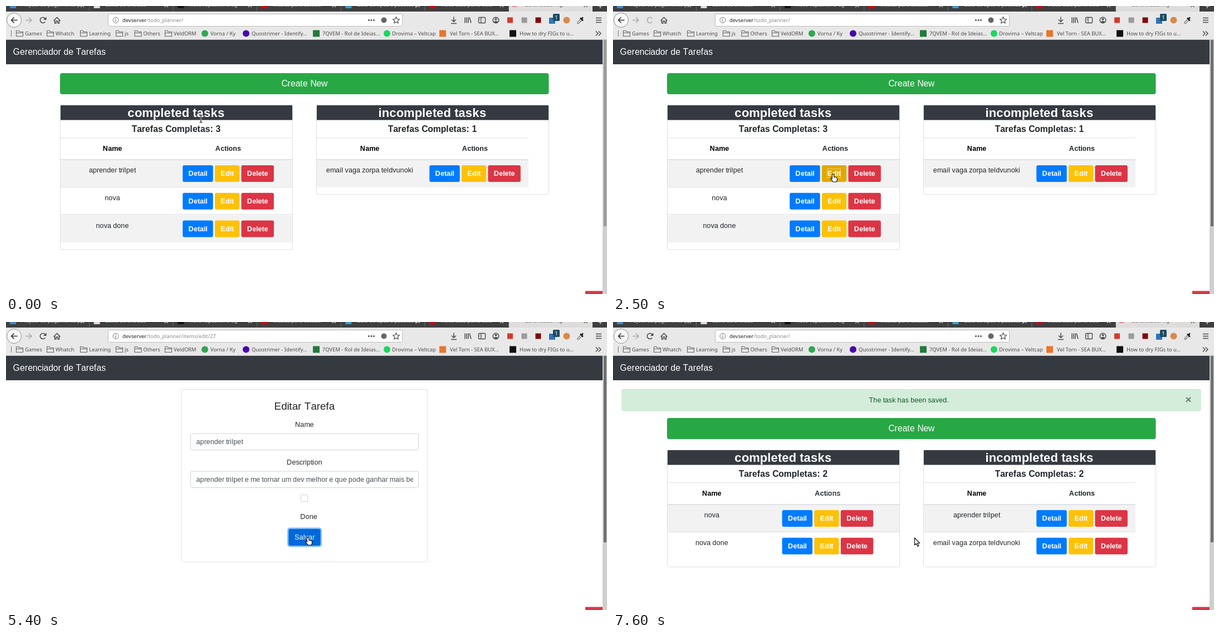
Write an HTML page with a canvas that moves like this. It is 1079x519 px and loops after 8000 ms.

```html
<!DOCTYPE html>
<html lang="pt">
<head>
<meta charset="utf-8">
<title>Gerenciador de Tarefas</title>
<style>
html, body { margin: 0; width: 100%; height: 100%; overflow: hidden; background: #fff; }
canvas { display: block; }
</style>
</head>
<body>
<canvas id="stage" width="1079" height="519"></canvas>
<script>
const ctx = document.getElementById('stage').getContext('2d');
const LOOP = 8000, ZOOM = .7855;
const UI = '"Noto Sans", sans-serif', PAGE = '"Liberation Sans", Arial, sans-serif';
const DARK = '#343a40', INK = '#212529', LINE = '#dee2e6', ICON = '#4a4a4a';

// Pointer steps: time, x, y, shape
const POINTER = [
  [0, 350, 203, 'beam'], [400, 350, 226, 'beam'], [500, 350, 254, 'arrow'],
  [600, 349, 282, 'arrow'], [700, 349, 300, 'hand'],
  [1400, 359, 300, 'hand'], [1500, 371, 301, 'hand'], [1600, 380, 303, 'hand'],
  [1700, 384, 303, 'hand'], [1800, 387, 303, 'hand'], [1900, 390, 303, 'hand'],
  [2000, 392, 303, 'hand'], [2100, 394, 303, 'hand'], [2200, 395, 303, 'hand'],
  [3700, 479.5, 306, 'arrow'], [4000, 503, 317, 'arrow'], [4100, 537, 334, 'arrow'],
  [4200, 549, 338, 'arrow'], [4400, 545, 331, 'arrow'], [4500, 539, 321, 'arrow'],
  [4900, 540, 333, 'arrow'], [5000, 541, 354, 'arrow'], [5100, 542, 376, 'hand'],
  [5200, 542, 388, 'hand'], [6600, 541, 389, 'arrow']
];
const SHAPES = {
  arrow: new Path2D('M.5 0V13l3-2.7 2.3 5 2.2-1-2.3-4.8H9.7Z'),
  hand: new Path2D('M-1.6 1Q0-1.2 1.6 1V5l4.4 1q1.6.5 1.5 2v3l-1.3 3H.2L-4 8.6q-.5-1.6 1-1.6l1.4 1.3Z')
};
// Reload button: start time and state
const RELOAD = [
  [0, 'ready'], [2500, 'wait'], [3700, 'stop'], [4200, 'wait'], [4400, 'ready'],
  [5600, 'wait'], [5900, 'stop'], [7300, 'wait'], [7500, 'ready']
];
const at = (steps, t) => steps.filter(s => s[0] <= t).pop();
const within = (t, from, to) => t >= from && t < to;

let pointer;

function rect(x, y, w, h, fill, stroke, radius = 0, line = 1) {
  ctx.beginPath();
  ctx.roundRect(x, y, w, h, radius);
  if (fill) { ctx.fillStyle = fill; ctx.fill(); }
  if (stroke) { ctx.strokeStyle = stroke; ctx.lineWidth = line; ctx.stroke(); }
}
function circle(x, y, r, fill, stroke, line = 1) {
  rect(x - r, y - r, 2 * r, 2 * r, fill, stroke, r, line);
}
// Page text: whole-pixel glyph advances, then zoomed. y is the middle of the capitals.
function text(str, x, y, { size = 16, color = INK, align = 'center', bold = false } = {}) {
  ctx.save();
  ctx.translate(x, y);
  ctx.scale(ZOOM, ZOOM);
  ctx.font = `${bold ? 'bold ' : ''}${size}px ${PAGE}`;
  ctx.fillStyle = color;
  const advances = [...str].map(c => Math.round(ctx.measureText(c).width));
  let left = align === 'center' ? -advances.reduce((a, b) => a + b) / 2 : 0;
  [...str].forEach((c, i) => {
    ctx.fillText(c, left, size * .35);
    left += advances[i];
  });
  ctx.restore();
}
// Browser text; returns its width
function label(str, x, y, color = '#4c4c4c') {
  ctx.font = `9.4px ${UI}`;
  ctx.fillStyle = color;
  ctx.fillText(str, x, y + 3.3);
  return ctx.measureText(str).width;
}
function icon(path, x, y, color = ICON, line = 1.4, fill = false) {
  ctx.save();
  ctx.translate(x, y);
  ctx.strokeStyle = ctx.fillStyle = color;
  ctx.lineWidth = line;
  ctx.lineJoin = 'round';
  ctx[fill ? 'fill' : 'stroke'](new Path2D(path));
  ctx.restore();
}

function tabs(t) {
  rect(0, 0, 1079, 10, '#3f3f3f');
  rect(903, 0, 150, 10, '#dedddc');
  const titles = ['Projeto de pagamento pt', 'Caixa de entrada', 'Novo repositorio ag', 'Musica para estudar',
    'Guia de tipos e pacotes p', 'Video aula parte dois', 'Gerenciador ng'];
  const colors = ['#4285d6', '#e8dada', '#111', '#d8000c', '#35a0d0', '#d8000c', '#e58a92'];
  const loading = within(t, 2400, 4200) || within(t, 5400, 7300);
  titles.forEach((title, i) => {
    const x = i * 150.6, active = i === 6;
    const color = active ? '#555' : '#d8d8d8';
    if (!active) rect(x + 149, 0, 1, 9, '#6a6a6a');
    if (!active) rect(x + 7, -6, 11, 10, colors[i]);
    else if (!loading) rect(909, -6, 8, 8, colors[i]);
    label(title, x + 27, -2.6, color);
    icon('M-3-5L3 1M3-5L-3 1', x + 137, 1, color, 1.2);
  });
  icon('M-4 0H4M0-4V4', 1067, 0, '#d8d8d8', 1.4);
}

function toolbar(t) {
  rect(0, 10, 1079, 51, '#e9e8e8');
  rect(0, 60, 1079, 1, '#c9c8c7');
  circle(14.5, 25.5, 13, '#f8f8f8', '#8e8e8e');
  icon('M6 0H-5M0-5L-5 0 0 5', 14.5, 25.5, '#333', 1.7);
  icon('M-6 0H5M0-5L5 0 0 5', 41, 25.5, '#aaa', 1.6);

  const state = at(RELOAD, t)[1];
  if (state === 'stop') icon('M-5-5L5 5M5-5L-5 5', 66.5, 25.5, ICON, 1.7);
  else {
    const color = state === 'wait' ? '#aaa' : ICON;
    icon('M3.8 3A5 5 0 1 1 3.8-3', 66.5, 25.5, color, 1.6);
    if (state === 'ready') icon('M6-6V-.5H.5Z', 66.5, 25.5, color, 1, true);
  }
  icon('M-6 1L0-5 6 1M-4 0V5.5H-1.5V1.5H1.5V5.5H4V0', 91.5, 25.5, ICON, 1.5);

  rect(183.5, 14.5, 528, 22, '#fff', '#bdbdbd', 2);
  circle(197, 25.5, 5, null, '#777');
  rect(196.4, 24.5, 1.2, 4, '#777');
  rect(196.4, 22.3, 1.2, 1.2, '#777');
  const host = label('devserver', 209, 25.5, '#222');
  const path = '/todo_planner/' + (within(t, 3700, 6100) ? 'items/edit/27' : '');
  label(path, 209 + host, 25.5, '#8a8a8a');
  for (const x of [651.5, 656, 660.5]) circle(x, 25.5, 1.5, ICON);
  circle(678.5, 25.5, 5, '#666');
  icon('M0-6L1.8-2 6-1.6 2.8 1.3 3.8 5.5 0 3.3-3.8 5.5-2.8 1.3-6-1.6-1.8-2Z', 700.5, 25.5, ICON, 1.2);

  icon('M0-6V3M-4-1L0 3 4-1M-5 6H5', 804, 25.5, ICON, 1.5);
  icon('M-5-5V5M-2-5V5M1-5V5M3-5L6 5', 829, 25.5, ICON, 1.5);
  rect(848.5, 20.5, 12, 10, null, ICON, 1.5, 1.4);
  icon('M-1.5-5V5M-4-2H-3M-4 0H-3', 854.5, 25.5, ICON, 1.2);
  circle(879.5, 25.5, 5.3, null, ICON, 1.5);
  circle(879.5, 23.7, 1.9, ICON);
  icon('M-3.5 3Q0-.5 3.5 3 0 6-3.5 3Z', 879.5, 25.5, ICON, 1, true);
  rect(900, 20.5, 10, 10, '#d13a2e');
  rect(925.5, 20.5, 10, 10, '#9a9a9a');
  rect(950.5, 20.5, 10, 10, '#800610');
  rect(975, 21, 11, 11, '#2f75b5');
  if (!within(t, 6100, 6400)) {
    rect(982, 14, 12, 13, '#1d4a63', null, 1.5);
    label('1', 985.3, 20.5, '#fff');
  }
  circle(1006.5, 25.5, 6, '#d98a4c');
  icon('M-5 6L-5 4 1-2 3 0-3 6Z', 1031, 25.5, '#777', 1.1);
  icon('M-1-3L4 2M1-1L4-4', 1032, 24.5, '#222', 2.6);
  icon('M-5-4H5M-5 0H5M-5 4H5', 1064, 25.5, ICON, 1.4);
}

function bookmarks() {
  rect(9, 44, 1, 11, '#777');
  const folders = [[18, 'Games'], [73, 'Whatch'], [133, 'Learning'], [197, 'js'], [230.5, 'Others'], [285, 'VeldORM']];
  for (const [x, name] of folders) {
    icon('M.5 1V10.5H12.5V2.5H6L5 .5H.5ZM.5 4.5H12.5', x, 44, '#666', 1.1);
    label(name, x + 16, 49.5);
  }
  const sites = [
    [357, 367, 'Vorna / Ky', '#2fa84f', 6], [431, 441, 'Quostrimer - Identify...', '#4608ad', 6],
    [557, 568, '7QVEM - Rol de Ideias...', '#237a3b'], [684, 693, 'Drovima – Veltcap', '#1ed760', 6],
    [784, 797, 'Vel Torn - SEA BUX...', '#e8762d'], [910, 922, 'How to dry FIGs to u...', '#111']
  ];
  for (const [x, left, name, color, r] of sites) {
    r ? circle(x, 49.5, r, color) : rect(x - 6, 43.5, 12, 12, color);
    label(name, left, 49.5);
  }
  icon('M-5-4L-1 0-5 4M0-4L4 0 0 4', 1064, 49.5, ICON, 1.5);
}

function button(str, x, y, w, color, hoverColor, bold = true) {
  const [, px, py, shape] = pointer;
  const hover = shape === 'hand' && px >= x && px <= x + w && py >= y && py <= y + 30;
  rect(x, y, w, 30, hover ? hoverColor : color, null, 3);
  text(str, x + w / 2, y + 15, { color: '#fff', bold });
}
function actions(x, y) {
  button('Detail', x, y, 54.5, '#007bff', '#0069d9');
  button('Edit', x + 57.7, y, 44.3, '#ffc107', '#e0a800');
  button('Delete', x + 105.2, y, 58.5, '#dc3545', '#c82333');
}
function taskCard(x, y, title, count, names, tableWidth, nameX, actionX) {
  const bottom = y + 99 + names.length * 49.7;
  rect(x + .5, y + .5, 417, bottom + 12.5 - y, '#fff', '#dfdfdf', 3);
  rect(x + 1, y + 1, 416, 26.5, DARK);
  text(title, x + 208.5, y + 14.5, { size: 28, color: '#fff', bold: true });
  text('Tarefas Completas: ' + count, x + 208.5, y + 43.5, { size: 20, bold: true });
  rect(x + 1, y + 59, tableWidth, 1, LINE);
  text('Name', nameX, y + 78.5, { color: '#000', bold: true });
  text('Actions', actionX, y + 78.5, { bold: true });
  names.forEach((name, i) => {
    const top = y + 99 + i * 49.7;
    rect(x + 1, top, tableWidth, 49.7, i % 2 ? '#fff' : '#f2f2f2');
    rect(x + 1, Math.round(top) - 1, tableWidth, i ? 1 : 2, LINE);
    text(name, nameX, top + 19);
    actions(actionX - 81.8, top + 10);
  });
}
function listPage(saved, focused) {
  const y = saved ? 52 : 0, learn = 'aprender trilpet', mail = 'email vaga zorpa teldvunoki';
  if (saved) {
    rect(16, 121.5, 1039, 38.5, '#d4edda', '#c3e6cb', 3);
    text('The task has been saved.', 531, 141, { color: '#155724' });
    text('×', 1033, 139.5, { size: 24, color: '#6a776d', bold: true });
  }
  rect(97, y + 121, 877.5, 38, '#28a745', null, 3.8);
  text('Create New', 535.8, y + 140, { size: 20, color: '#fff' });
  const done = ['nova', 'nova done'], open = [mail];
  (saved ? open : done).unshift(learn);
  const shift = saved ? 13.6 : 0;
  taskCard(97, y + 178, 'completed tasks', done.length, done, 416, 191 - shift, 399 - shift);
  taskCard(557, y + 178, 'incompleted tasks', open.length, open, 380, 653, 842);
  if (focused) {
    ctx.setLineDash([1, 1]);
    rect(384.5, 293.5, 24, 16, null, '#fff');
    ctx.setLineDash([]);
  }
}

function field(name, value, y) {
  text(name, 535.8, y);
  rect(331.5, y + 16, 409, 29.5, '#fff', '#ced4da', 3);
  ctx.save();
  ctx.beginPath();
  ctx.rect(341, y + 16, 390, 29);
  ctx.clip();
  text(value, 341.5, y + 31, { color: '#495057', align: 'left' });
  ctx.restore();
}
function editPage(checked, focused) {
  rect(315, 121.5, 442, 310.5, '#fff', '#dfdfdf', 3);
  text('Editar Tarefa', 535.8, 151.5, { size: 24 });
  field('Name', 'aprender trilpet', 185);
  field('Description', 'aprender trilpet e me tornar um dev melhor e que pode ganhar mais bem', 253);
  if (checked) {
    rect(529, 311, 12.5, 13, '#e2544a', null, 2);
    icon('M-3.5 0L-1 2.5 3.8-2.5', 535.2, 317.5, '#fff', 1.6);
  } else rect(529.5, 311.5, 12, 12, '#fff', '#cfcfcf', 1);
  text('Done', 543.5, 351);
  if (focused) rect(505, 370.5, 62, 35, '#80bdff', null, 5);
  button('Salvar', 507.5, 373, 57, '#007bff', '#0069d9', false);
}

function drawPointer() {
  const [, x, y, shape] = pointer;
  ctx.save();
  ctx.translate(x, y);
  if (shape === 'beam') {
    const beam = 'M-2.5-6.5Q0-6.5 0-5V5.5Q0 7-2.5 7M2.5-6.5Q0-6.5 0-5V5.5Q0 7 2.5 7';
    icon(beam, 0, 0, '#fff', 2.4);
    icon(beam, 0, 0, '#111', 1.2);
  } else {
    ctx.lineJoin = 'round';
    ctx.lineWidth = 1.2;
    ctx.fillStyle = '#fff';
    ctx.strokeStyle = '#111';
    ctx.fill(SHAPES[shape]);
    ctx.stroke(SHAPES[shape]);
  }
  ctx.restore();
}

function draw(now) {
  const t = now % LOOP;
  pointer = at(POINTER, t);
  rect(0, 0, 1079, 519, '#fff');
  tabs(t);
  toolbar(t);
  bookmarks();
  rect(0, 61, 1071, 44, DARK);
  text('Gerenciador de Tarefas', 12.5, 83, { size: 20, color: '#fff', align: 'left' });
  if (within(t, 3700, 6600)) editPage(t < 4800, t >= 5400);
  else listPage(t >= 6600, t >= 2400);
  if (!within(t, 3700, 3800) && !within(t, 6600, 7000)) rect(1040, 513.5, 31, 5.5, '#dc3545');
  rect(1071, 61, 8, 458, '#cfcfcf');
  rect(1073, 61, 5, 336, t < 2400 ? '#9a9a9a' : '#6f6f6f');
  drawPointer();
  requestAnimationFrame(draw);
}
requestAnimationFrame(draw);
</script>
</body>
</html>
```
